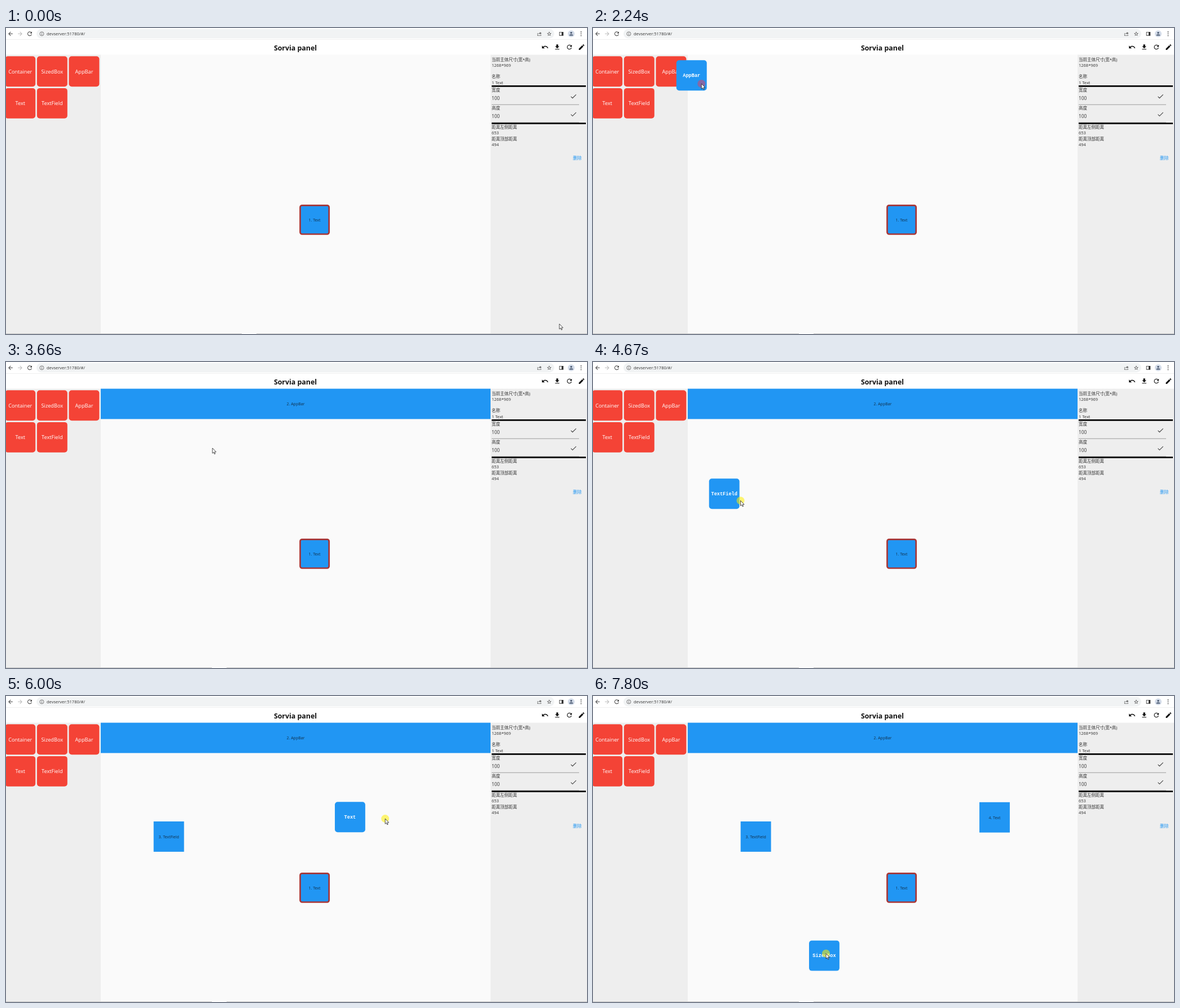
These frames come from a looping animation (1030 by 544 pixels, 8 s). An HTML page:

```html
<!DOCTYPE html>
<html lang="zh">
<head>
<meta charset="utf-8">
<style>
  html, body { margin: 0; width: 100%; height: 100%; overflow: hidden; background: #fff; }
  svg { display: block; width: 1030px; height: 544px; font-family: "Open Sans", "Noto Sans CJK SC", "Noto Sans CJK", sans-serif; }
  .mid { text-anchor: middle; }
  .title { font-size: 12.4px; font-weight: 700; fill: #111; }
  .tile { font-size: 9.2px; fill: #fff; }
  .label { font-size: 7px; fill: #12304a; }
  .card { font: bold 8.6px "Liberation Mono", monospace; fill: #fff; }
  .info { font-size: 7.5px; fill: #333; }
  .value { font-size: 8.3px; fill: #333; }
  .link { font-size: 7.8px; font-weight: 500; fill: #2196f3; }
</style>
</head>
<body>
<svg id="stage" viewBox="0 0 1030 544"></svg>
<script>
const stage = document.getElementById('stage');
const BLUE = '#2196f3', RED = '#f44336', SIZE = 53.9, PITCH = 56.6, LOOP = 8000, LAG = 55;

function add(tag, attrs, parent = stage) {
  const node = document.createElementNS('http://www.w3.org/2000/svg', tag);
  for (const key in attrs) node.setAttribute(key, attrs[key]);
  parent.append(node);
  return node;
}
const rect = (x, y, width, height, fill, more, parent) =>
  add('rect', { x, y, width, height, fill, ...more }, parent);
const circle = (cx, cy, r, fill, more) => add('circle', { cx, cy, r, fill, ...more });
function text(x, y, string, cls, parent) {
  add('text', { x, y, class: cls }, parent).textContent = string;
}
// A 24-unit icon centred on (x, y).
const icon = (d, x, y, size, fill = '#111', flip = 1) => add('path', {
  d, fill, transform: `translate(${x} ${y}) scale(${flip * size / 24} ${size / 24}) translate(-12 -12)`
});
// A blue box with its name in the middle.
function box(x, y, width, name, cls, more) {
  const node = add('g');
  rect(x, y, width, SIZE, BLUE, more, node);
  text(x + width / 2, y + 29.8, name, cls + ' mid', node);
  return node;
}
const show = (node, on) => node.setAttribute('visibility', on ? 'visible' : 'hidden');
const move = (node, x, y) => node.setAttribute('transform', `translate(${x} ${y})`);

const ICON = {
  back: 'M20 11H7.83l5.59-5.59L12 4l-8 8 8 8 1.41-1.41L7.83 13H20v-2z',
  reload: 'M17.65 6.35C16.2 4.9 14.21 4 12 4c-4.42 0-7.99 3.58-7.99 8s3.57 8 7.99 8c3.73 0 6.84-2.55 7.73-6h-2.08c-.82 2.33-3.04 4-5.65 4-3.31 0-6-2.69-6-6s2.69-6 6-6c1.66 0 3.14.69 4.22 1.78L13 11h7V4l-2.35 2.35z',
  star: 'M22 9.24l-7.19-.62L12 2 9.19 8.63 2 9.24l5.46 4.73L5.82 21 12 17.27 18.18 21l-1.63-7.03L22 9.24zM12 15.4l-3.76 2.27 1-4.28-3.32-2.88 4.38-.38L12 6.1l1.71 4.04 4.38.38-3.32 2.88 1 4.28L12 15.4z',
  share: 'M3 9h3v2H5v8h13v-4h2v6H3zM15 3l7 6-7 6v-4c-3 0-5 1-7 4 0-5 3-8 7-8z',
  panel: 'M3 4h18v16H3zM5 6v12h8V6z',
  undo: 'M12.5 8c-2.65 0-5.05.99-6.9 2.6L2 7v9h9l-3.62-3.62c1.39-1.16 3.16-1.88 5.12-1.88 3.54 0 6.55 2.31 7.6 5.5l2.37-.78C21.08 11.03 17.15 8 12.5 8z',
  download: 'M19 9h-4V3H9v6H5l7 7 7-7zM5 18v2h14v-2H5z',
  edit: 'M3 17.25V21h3.75L17.81 9.94l-3.75-3.75L3 17.25zM20.71 7.04c.39-.39.39-1.02 0-1.41l-2.34-2.34c-.39-.39-1.02-.39-1.41 0l-1.83 1.83 3.75 3.75 1.83-1.83z',
  check: 'M9 16.17L4.83 12l-1.42 1.41L9 19 21 7l-1.41-1.41z'
};

// Browser bar
rect(54, 2, 918, 16.5, '#f1f3f4', { rx: 8.2 });
rect(0, 20, 1030, .6, '#e4e4e4');
icon(ICON.back, 8, 10.3, 11.5, '#444');
icon(ICON.back, 25, 10.3, 11.5, '#bbb', -1);
icon(ICON.reload, 42, 10.3, 12, '#444');
circle(63.5, 10.3, 3.5, 'none', { stroke: '#555', 'stroke-width': .8 });
rect(63.1, 9.8, .9, 2.5, '#555');
rect(63.1, 8.1, .9, .9, '#555');
text(72, 12.9, 'devserver:51780/#/', 'info');
icon(ICON.share, 945.5, 10.5, 9.5, '#666');
icon(ICON.star, 963, 10.3, 9.5, '#444');
icon(ICON.panel, 984.5, 10.3, 10, '#333');
circle(1002, 10.3, 6, '#d3dbe8');
circle(1002, 8.6, 1.7, '#44546c');
add('path', { d: 'M998.6 13.6q0-2.4 3.4-2.4t3.4 2.4z', fill: '#44546c' });
for (const dy of [-3.3, 0, 3.3]) circle(1019.5, 10.3 + dy, .9, '#444');

// Title bar and panels
text(513, 39.6, 'Sorvia panel', 'title mid');
['undo', 'download', 'reload', 'edit'].forEach((name, i) => icon(ICON[name], 955.6 + i * 21.6, 34, 13));
rect(0, 47.5, 168, 495.5, '#eee');
rect(168, 47.5, 691, 495.5, '#fafafa');
rect(859, 47.5, 171, 495.5, '#eee');
rect(0, 543, 1030, 1, '#c4c4c4');
const gap = rect(0, 543, 26, 1, '#fff');

const tileAt = i => [-1.7 + i % 3 * PITCH, 50.3 + Math.floor(i / 3) * PITCH];
const names = ['Container', 'SizedBox', 'AppBar', 'Text', 'TextField'];
names.forEach((name, i) => {
  const [x, y] = tileAt(i);
  rect(x, y, SIZE, SIZE, RED, { rx: 5 });
  text(x + SIZE / 2, y + 30.5, name, 'tile mid');
});

// Properties
const lines = (y, list) => list.forEach((string, i) => text(861, y + i * 10.3, string, 'info'));
lines(58.5, ['当前主体尺寸(宽*高)', '1268*969', '', '名称', '1 Text']);
['宽度', '高度'].forEach((name, i) => {
  const y = 112.8 + i * 31.8;
  lines(y, [name]);
  text(861, y + 15.2, '100', 'value');
  icon(ICON.check, 1006, y + 8.7, 13.5, '#444');
  rect(861, y + 23, 155, .8, '#888');
});
for (const y of [102, 168.3]) rect(861, y, 167, 2.7, '#000');
lines(179, ['距离左侧距离', '653', '距离顶部距离', '494']);
text(1005, 233.5, '删除', 'link');

box(521.5, 315.3, 51.2, '', 'label', { height: 51.2, rx: 3.5, stroke: '#a93636', 'stroke-width': 2.7 });
text(547, 343.8, '1. Text', 'label mid');

// Each drag lifts a tile, carries it to a spot on the board and leaves a component there.
const drags = [
  { tile: 2, lift: 1995, drop: 3040, release: 3260, grip: [25, 38], to: [272, 81] },
  { tile: 4, lift: 4310, drop: 4950, release: 4950, grip: [27, 20], to: [261.7, 223] },
  { tile: 3, lift: 5507, drop: 6320, release: 6320, grip: [28, 29], to: [685, 188.8] },
  { tile: 1, lift: 7080, drop: LOOP, release: LOOP, grip: [30, 23], to: [383, 434.7] }
];
const plus = (a, b) => [a[0] + b[0], a[1] + b[1]];
drags.forEach((drag, i) => {
  const name = names[drag.tile], label = `${i + 2}. ${name}`;
  drag.from = plus(tileAt(drag.tile), drag.grip);
  drag.end = plus(drag.to, drag.grip);
  drag.placed = name === 'AppBar' ? box(168, 47.5, 691, label, 'label') : box(...drag.to, SIZE, label, 'label');
});
for (const drag of drags) drag.card = box(0, 0, SIZE, names[drag.tile], 'card', { rx: 5 });

const pointer = add('g');
const halo = add('circle', { r: 7 }, pointer);
add('path', {
  d: 'M0 0V9.3L2.1 7.4 3.6 10.7 5 10.1 3.6 6.9H6.5Z',
  fill: '#fff', stroke: '#222', 'stroke-width': .8
}, pointer);

// The pointer's route: eased moves, each bowed down by a number of pixels.
const home = [981, 526];
const [bar, field, label, sized] = drags;
const route = [];
const go = (start, time, to, bow = 0) => route.push({ start, time, to, bow });
go(40, 820, [68, 130]);
go(870, 330, [37, 109]);
go(1200, 400, [105, 136]);
go(1650, 330, bar.from);
go(bar.lift, 620, bar.end);
go(3210, 180, [387, 162]);
go(3390, 150, [366, 153]);
go(3660, 630, field.from, 30);
go(field.lift, 458, [285, 262]);
go(4768, 140, field.end);
go(4950, 500, label.from);
go(label.lift, 580, label.end, 23);
go(6300, 557, sized.from, 106);
go(sized.lift, 640, sized.end);

function pointerAt(t) {
  let [x, y] = home;
  for (const { start, time, to, bow } of route) {
    if (t < start) break;
    const u = Math.min(1, (t - start) / time), k = u * u * (3 - 2 * u);
    x += (to[0] - x) * k;
    y += (to[1] - y) * k + bow * 4 * k * (1 - k);
  }
  return [x, y];
}

function draw(t) {
  gap.setAttribute('x', t < 1760 ? 418 : 365);

  // A dragged card trails the pointer a little.
  const [cardX, cardY] = pointerAt(t - LAG);
  for (const { card, placed, lift, drop, grip } of drags) {
    show(placed, t >= drop);
    show(card, t >= lift + LAG && t < drop);
    move(card, cardX - grip[0], cardY - grip[1]);
  }

  const held = drags.find(d => t >= d.lift && t < d.release);
  show(halo, held);
  if (held) halo.setAttribute('fill', t - held.lift < 300 ? 'rgba(235,60,90,.5)' : 'rgba(255,238,0,.55)');
  move(pointer, ...pointerAt(t));
}

const start = performance.now();
function tick() {
  draw((performance.now() - start) % LOOP);
  requestAnimationFrame(tick);
}
tick();
</script>
</body>
</html>
```
